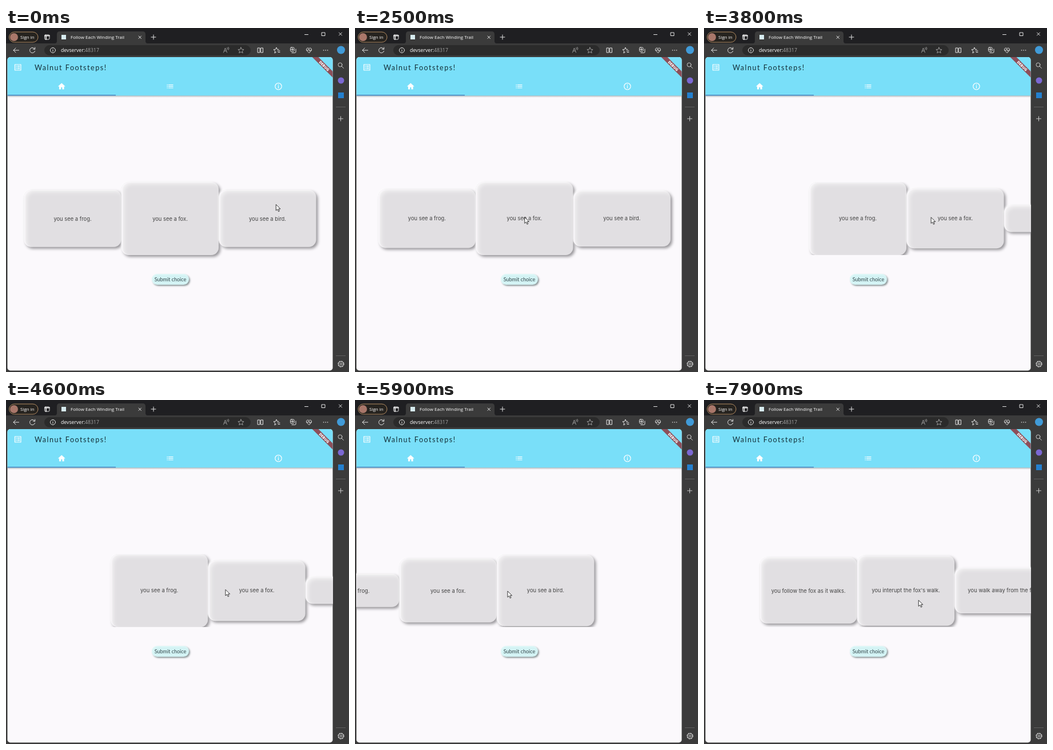
An HTML page that plays this animation: 600 px wide and 603 px high, repeating every 8000 ms.

```html
<!DOCTYPE html>
<html lang="en">
<head>
<meta charset="utf-8">
<title>Story cards</title>
<style>
  html, body { margin: 0; width: 100%; height: 100%; overflow: hidden; background: #3b3b3b; }
  svg { position: absolute; left: 0; top: 0; display: block; overflow: visible; }
  .ui { font-family: "Open Sans", "Noto Sans", sans-serif; font-size: 8px; fill: #fff; }
  .address { font-size: 8.7px; }
  .title { font: 12.6px Lato, sans-serif; letter-spacing: 1.5px; fill: #14303a; }
  .debug { font-size: 6.5px; font-weight: 800; text-anchor: middle; }
  .line { fill: none; stroke: #e6e6e6; stroke-width: 1; stroke-linecap: round; stroke-linejoin: round; }
  .dim { stroke: #9a9a9a; }
  .side { stroke: #c9c9c9; }
  .white { stroke: #fff; stroke-width: 1.2; stroke-linecap: butt; }
  #view { position: absolute; left: 2px; top: 51px; width: 570px; height: 549px; overflow: hidden; border-radius: 5px; }
  #strip { position: absolute; left: 0; top: 219px; width: 570px; height: 128px; }
  .card {
    position: absolute; left: 0; top: 0; width: 170px;
    display: flex; align-items: center; justify-content: center;
    border-radius: 13px; background: #e1dfe2; color: #444;
    font: 9.4px Inter, sans-serif; white-space: nowrap;
    box-shadow: 3px 3px 5px #979599, -1px -1px 3px #fffc,
      inset 2px 1px 2px #faf8fb, inset 5px 4px 6px #f2f1f2;
  }
  #submit {
    position: absolute; left: 253px; top: 380px; width: 65px; height: 19px;
    border-radius: 10px; background: #d3f3f4; color: #33474b;
    font: 9px/19px Lato, sans-serif; text-align: center; white-space: nowrap;
    box-shadow: 2px 2px 3px #8b9698, inset 1px 1px 3px #e9fbfb;
  }
</style>
</head>
<body>
<svg width="600" height="603" viewBox="0 0 600 603">
  <defs>
    <linearGradient id="drop" x2="0" y2="1">
      <stop stop-color="#8f9598" stop-opacity=".75"/>
      <stop offset="1" stop-color="#a0a0a0" stop-opacity="0"/>
    </linearGradient>
    <clipPath id="pageClip"><rect x="2.500" y="51" width="569" height="549.500" rx="5"/></clipPath>
  </defs>
  <rect width="600" height="603" fill="#3b3b3b"/>
  <rect width="600" height="27" fill="#1f1f22"/>

  <!-- title bar -->
  <rect x="5.500" y="7" width="50.500" height="18" rx="9" fill="#26231f" stroke="#b28c62"/>
  <circle cx="14" cy="16" r="7" fill="#a9776a"/>
  <text class="ui" x="25" y="19">Sign in</text>
  <path d="M85 27Q89 27 89 23V11Q89 6 94 6H239Q244 6 244 11V23Q244 27 248 27Z" fill="#3b3b3b"/>
  <rect x="97" y="12" width="8" height="8" fill="#d6ebef"/>
  <text class="ui" x="113" y="19">Follow Each Winding Trail</text>
  <g class="line">
    <rect x="67.500" y="12" width="8.500" height="8" rx="1.500"/>
    <path d="M68 13.500H76M70 14V20" stroke-width="1.800"/>
    <path d="M232 14l4.500 4.500m0-4.500l-4.500 4.500M258 12v8m-4-4h8"/>
    <path d="M522.500 11.500h6M552.500 8h5.500v5.500h-5.500zM582.500 8l5 5m0-5l-5 5"/>
  </g>

  <!-- toolbar -->
  <rect x="67" y="30" width="361" height="18" rx="9" fill="#2b2b2b"/>
  <text class="ui address" x="96" y="42">devserver:<tspan fill="#a5a5a5">48317</tspan></text>
  <g class="line">
    <path d="M22.500 39H13m4-4l-4 4 4 4M50.300 37A4.600 4.600 0 1 0 50.600 40.500M50.700 34v3.200h-3.200"/>
    <circle cx="82" cy="39" r="4.500"/><path d="M82 38.500v2.700M82 36.700v.1"/>
    <path d="M440.500 35h3.500v8h-3.500zM446 35h3.500v8H446z"/>
    <path d="M477 37.500h-2.500L473 34l-1.400 3.500-3.600.4 2.800 2.500-.9 3.600 2.600-1.700M475 40h4m-3 2.500h3"/>
    <rect x="497.500" y="34" width="6.500" height="7" rx="1.500"/><path d="M500 43.500h5.500q1.500 0 1.500-1.500v-5M500.800 35.500v4m-2-2h4"/>
    <path d="M530 43.500l-4-4c-2-3 1.500-6 4-3.300 2.500-2.700 6 .3 4 3.300zM526 39h2.500l1.300-2 1.500 3.500 1-1.500h2"/>
    <path d="M555.500 39h.1M559 39h.1M562.500 39h.1" stroke-width="1.600"/>
  </g>
  <g class="line dim">
    <path d="M380.500 43l3-8 3 8m-5-2.800h4M387 34.500q1.200 1.500 0 3M389 33.500q2 2.500 0 5"/>
    <path d="M411 34l1.500 3.400 3.600.4-2.700 2.400.8 3.600-3.200-1.900-3.200 1.900.8-3.600-2.700-2.400 3.600-.4z"/>
  </g>

  <!-- sidebar -->
  <circle cx="586" cy="38.500" r="7" fill="#419bd8"/>
  <circle cx="586" cy="92" r="5.500" fill="#7b68d3"/>
  <rect x="581" y="113" width="10" height="10" fill="#2480cf"/>
  <path d="M577 138.500h17M577 574.500h17" stroke="#606060"/>
  <g class="line side">
    <circle cx="584.500" cy="64.500" r="3.500"/><path d="M587 67l3.500 3.500M585.500 155v8m-4-4h8"/>
    <circle cx="586" cy="589" r="1.700"/><circle cx="586" cy="589" r="4.200"/>
    <circle cx="586" cy="589" r="5" stroke-dasharray="1.900 2.027" stroke-width="1.300"/>
  </g>

  <!-- page -->
  <g clip-path="url(#pageClip)">
    <rect x="2" y="51" width="570" height="550" fill="#fbf9fc"/>
    <rect x="2" y="118" width="570" height="4" fill="url(#drop)"/>
    <rect x="2" y="51" width="570" height="67.500" fill="#79dff9"/>
    <rect x="2" y="117" width="190" height="1.500" fill="#4a86c0"/>
    <g class="line white">
      <rect x="15.500" y="64" width="10.500" height="10"/>
      <path d="M17.300 66.700h1.500m1 0h4.500M17.300 69h1.500m1 0h4.500M17.300 71.300h1.500m1 0h4.500"/>
      <path d="M281.500 99.500h1.500m1 0h8.500M281.500 102.200h1.500m1 0h8.500M281.500 105h1.500m1 0h8.500"/>
      <circle cx="476.500" cy="102.300" r="5.700"/><path d="M476.500 101.500v4M476.500 99v1.400"/>
    </g>
    <path d="M97.300 96.500l-6.500 6H93v5h3.200v-3.600h2.200v3.600h3.200v-5h2.200z" fill="#fff"/>
    <text class="title" x="50" y="74">Walnut Footsteps!</text>
    <g transform="translate(572 51) rotate(45)">
      <rect x="-30" y="18" width="60" height="7.700" fill="#8c4f5a"/>
      <text class="ui debug" y="24.200">DEBUG</text>
    </g>
  </g>
</svg>

<div id="view">
  <div id="strip"><div class="card"></div><div class="card"></div><div class="card"></div></div>
  <div id="submit">Submit choice</div>
</div>

<svg id="cursor" width="10" height="15" viewBox="0 0 10 15">
  <path d="M.3 .3V11L2.800 8.700l1.800 4 1.700-.8L4.600 8.100H8Z" fill="#fff" stroke="#222" stroke-width=".9"/>
</svg>

<script>
const LOOP = 8000, STEP = 100, TEXT_SWAP = 6800;
const PITCH = 170.5, MID_X = 285, CARD_W = 170, CARD_H = 128, VIEW_W = 570;
const HAND_LEAD = 1.35; // the hand lets go before the cards settle

const STORIES = [
  ["you see a frog.", "you see a fox.", "you see a bird."],
  ["you follow the fox as it walks.", "you interupt the fox's walk.", "you walk away from the fox."]
];

const act = (from, to, goal) => ({ from, to, goal });
const glide = (from, to, x, y) => act(from, to, { x, y });
const swipe = (from, to, shift, x, y) => act(from, to, { shift, x, y });

const ACTIONS = [
  glide(0, 900, 321, 225),
  glide(1300, 1400, 382, 199),
  glide(1500, 1800, 341, 311),
  glide(1800, 2300, 285, 332),
  swipe(2400, 3100, PITCH, 403, 326),
  swipe(3300, 3600, 125, 357, 328),
  swipe(3600, 3950, PITCH, 403, 332),
  swipe(4505, 5170, -PITCH, 204, 332),
  swipe(5600, 6475, 0, 345, 338),
  glide(5950, 6400, 285, 447),
  glide(6400, 6600, 286, 440),
  glide(6950, 7250, 300, 344),
  swipe(7300, 7650, 104, 413, 350),
  swipe(7700, 8190, 0, 347, 351)
];

const clamp = v => Math.min(1, Math.max(0, v));
const smooth = p => p * p * (3 - 2 * p);

function poseAt(t) {
  const pose = { x: 472, y: 309, shift: 0 };
  for (const { from, to, goal } of ACTIONS) {
    const progress = (t - from) / (to - from);
    for (const key in goal) {
      const lead = "shift" in goal && key !== "shift" ? HAND_LEAD : 1;
      pose[key] += (goal[key] - pose[key]) * smooth(clamp(progress * lead));
    }
  }
  return pose;
}

// cubic-bezier(0, 0, .58, 1), solved by bisection
function easeOut(x) {
  let lo = 0, hi = 1;
  for (let n = 0; n < 20; n++) {
    const s = (lo + hi) / 2;
    if (1.74 * s * s - 0.74 * s ** 3 < x) lo = s; else hi = s;
  }
  return smooth(lo);
}

const strip = document.getElementById("strip");
const cursor = document.getElementById("cursor");
const cards = [...strip.children];

function draw(now) {
  const t = Math.floor((now % LOOP) / STEP) * STEP;
  const { x, y, shift } = poseAt(t);
  const story = STORIES[t < TEXT_SWAP ? 0 : 1];

  cards.forEach((card, i) => {
    const offset = shift + (i - 1) * PITCH;
    const height = CARD_H * easeOut(clamp(1 - 0.4 * Math.abs(offset) / PITCH));
    card.style.height = height + "px";
    card.style.transform = `translate(${MID_X + offset - CARD_W / 2}px, ${(CARD_H - height) / 2}px)`;
    if (card.textContent !== story[i]) card.textContent = story[i];
  });

  // shadows are cut only while a card reaches past the view
  const spills = Math.abs(shift) + 1.5 * PITCH > VIEW_W / 2;
  strip.style.overflow = spills ? "hidden" : "visible";
  cursor.style.transform = `translate(${x}px, ${y}px)`;
  requestAnimationFrame(draw);
}
draw(performance.now());
</script>
</body>
</html>
```
